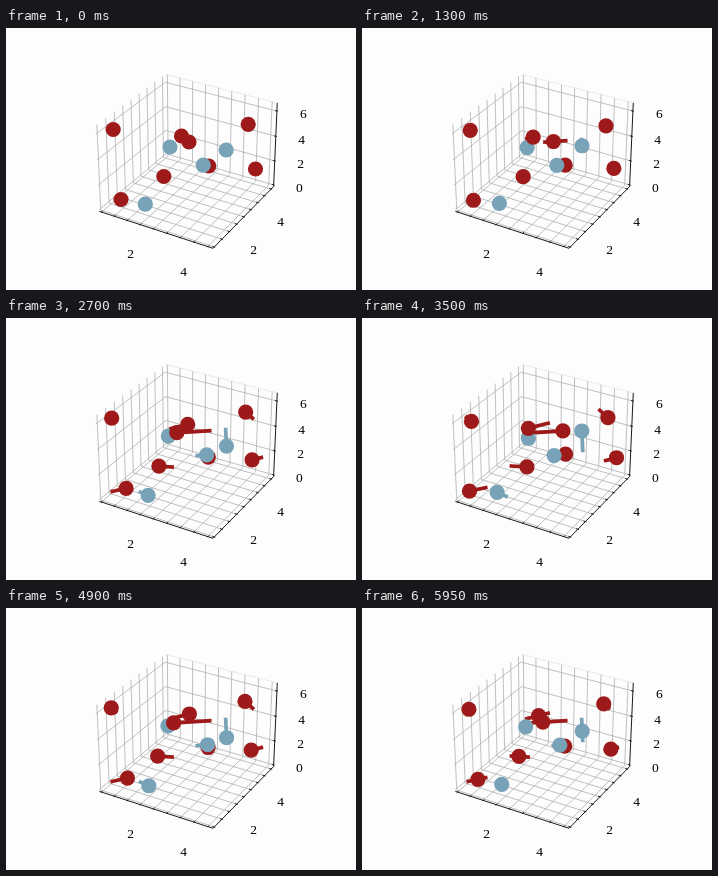
Write an HTML page with a canvas that moves like this. It is 350 px wide and 262 px high and loops after 6 s.

```html
<!DOCTYPE html>
<html lang="en">
<head>
<meta charset="utf-8">
<title>Oscillating atoms</title>
<style>
  html, body { margin: 0; width: 100%; height: 100%; overflow: hidden; background: #fdfdfd; }
  canvas { display: block; width: 350px; height: 262px; }
</style>
</head>
<body>
<canvas id="stage"></canvas>
<script>
const W = 350, H = 262, LOOP = 6000, STEP = 50, PERIOD = 3000;
const PAPER = '#fdfdfd', RED = '#9e1a1a', BLUE = '#78a2b7';
const GRID = '#b0b0b0', EDGE = '#e6e6e6', INK = '#000';
const RADIUS = 7.6, TRAIL = 3.7;

const canvas = document.getElementById('stage');
const dpr = window.devicePixelRatio || 1;
canvas.width = W * dpr;
canvas.height = H * dpr;
const ctx = canvas.getContext('2d');
ctx.scale(dpr, dpr);

// Perspective box: data limits and half sizes per axis
const lo = [0.415, 0.415, -0.135], hi = [4.685, 4.685, 6.635];
const half = [0.5714, 0.5714, 0.4286];
const VIEW = 10, SCALE = 1140, CX = 182, CY = 129.3;

function project(p) {
  const [x, y, z] = p.map((v, i) => ((v - lo[i]) / (hi[i] - lo[i]) * 2 - 1) * half[i]);
  const k = SCALE / (VIEW - (0.433 * x - 0.75 * y + 0.5 * z));
  return [CX + k * (0.866 * x + 0.5 * y), CY - k * (-0.25 * x + 0.433 * y + 0.866 * z)];
}

function path(points, color, width) {
  ctx.strokeStyle = color;
  ctx.lineWidth = width;
  ctx.beginPath();
  points.forEach(p => ctx.lineTo(...p));
  ctx.stroke();
}

const poly = (points, color, width) => path(points.map(project), color, width);

const labels = [
  ['2', 124.6, 225], ['4', 177.6, 243],
  ['2', 247.7, 221.3], ['4', 274.5, 193.3],
  ['0', 293.3, 159.3], ['2', 294.5, 135.5], ['4', 295.5, 111], ['6', 297.3, 85.8]
];

function drawAxes() {
  const [x0, y0, z0] = lo, [x1, y1, z1] = hi;
  const dx = (x1 - x0) / 60, dy = (y1 - y0) / 60;
  ctx.lineCap = 'butt';
  ctx.lineJoin = 'round';
  poly([[x0, y1, z1], [x1, y1, z1]], EDGE, 0.8);
  for (let v = 0.5; v <= 4.5; v += 0.5) {
    poly([[v, y0, z0], [v, y1, z0], [v, y1, z1]], GRID, 0.8);
    poly([[x1, v, z0], [x0, v, z0], [x0, v, z1]], GRID, 0.8);
  }
  for (let v = 0; v <= 6; v += 2) {
    poly([[x0, y0, v], [x0, y1, v], [x1, y1, v]], GRID, 0.8);
  }
  poly([[x0, y0, z0], [x1, y0, z0], [x1, y1, z0], [x1, y1, z1]], INK, 0.9);
  for (let v = 0.5; v <= 4.5; v += 0.5) {
    poly([[v, y0 - dy / 2, z0], [v, y0 + dy, z0]], INK, 0.8);
    poly([[x1 + dx / 2, v, z0], [x1 - dx, v, z0]], INK, 0.8);
  }
  for (let v = 0; v <= 6; v += 2) {
    poly([[x1 + dx / 2, y1, v], [x1 - dx, y1, v]], INK, 0.8);
  }
  ctx.fillStyle = INK;
  ctx.font = '13.5px "Liberation Serif", serif';
  ctx.textAlign = 'center';
  ctx.textBaseline = 'alphabetic';
  labels.forEach(([text, x, y]) => ctx.fillText(text, x, y + 4.5));
}

// Back to front: rest position, then displacement at full swing
const atoms = [
  [BLUE, 164, 119, 2.8, 1.45],
  [RED, 175.5, 108, -10.6, 2.7],
  [RED, 183, 114, 20.7, -1.2],
  [RED, 107.2, 101.5, 2.6, 2.2],
  [RED, 242.2, 96.3, 4.35, 3.85],
  [BLUE, 220.2, 122, -0.5, -10.4],
  [RED, 202.8, 138, 0.9, -2.05],
  [BLUE, 197.2, 137.1, -5.9, 0.5],
  [RED, 157.8, 148.5, 8.3, 0.5],
  [RED, 249.5, 141, 5.8, -1.45],
  [RED, 115, 171.5, -8.7, 1.9],
  [BLUE, 139.3, 176.2, -4.8, -2.1]
];

const at = ([, x, y, dx, dy], s) => [x + dx * s, y + dy * s];

function draw(t) {
  const swing = Math.sin(2 * Math.PI * t / PERIOD);
  // Range of the swing already travelled since the loop began
  const top = t < PERIOD / 4 ? swing : 1;
  const low = t < PERIOD / 2 ? 0 : t < PERIOD * 0.75 ? swing : -1;

  ctx.fillStyle = PAPER;
  ctx.fillRect(0, 0, W, H);
  drawAxes();

  if (t > 0) {
    ctx.lineCap = 'square';
    atoms.forEach(a => path([at(a, low), at(a, top)], a[0], TRAIL));
  }
  atoms.forEach(a => {
    ctx.fillStyle = a[0];
    ctx.beginPath();
    ctx.arc(...at(a, swing), RADIUS, 0, 2 * Math.PI);
    ctx.fill();
  });
}

let start = null;
function tick(now) {
  if (start === null) start = now;
  const t = Math.max(0, now - start) % LOOP;
  draw(Math.floor(t / STEP) * STEP);
  requestAnimationFrame(tick);
}
draw(0);
requestAnimationFrame(tick);
</script>
</body>
</html>
```
